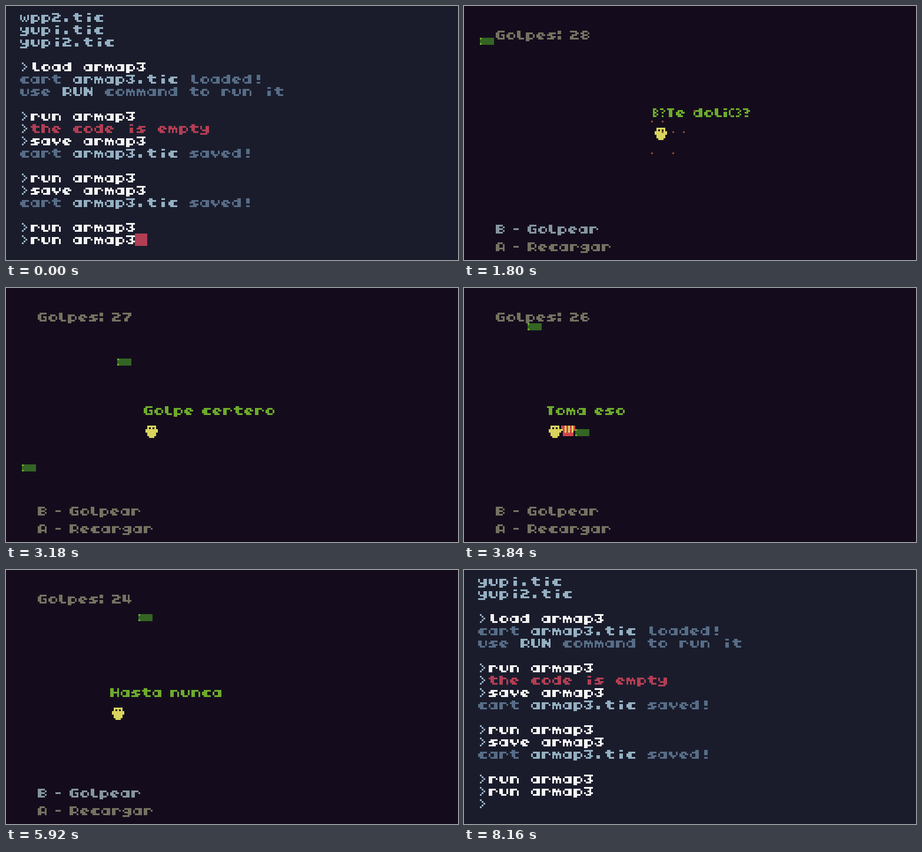
An HTML page with a canvas that plays this animation: 768 px wide and 432 px high, repeating every 8.2 s.

```html
<!DOCTYPE html>
<html lang="es">
<head>
<meta charset="utf-8">
<title>Golpes</title>
<style>
  html, body { margin: 0; width: 100%; height: 100%; overflow: hidden; background: #1a1c2c; }
  canvas { display: block; width: 768px; height: 432px; }
</style>
</head>
<body>
<canvas id="stage" width="768" height="432"></canvas>
<script>
const ctx = document.getElementById('stage').getContext('2d');
const LOOP = 8200, STEP = 20, GAME_ON = 440, GAME_OFF = 7640, BLINK = 8160;
const TICKS = 0.06; // game ticks per ms

function box(color, x, y, w = 1, h = 1) {
  ctx.fillStyle = color;
  ctx.fillRect(x, y, w, h);
}

// ---- stroke font: pairs are points xy, a plus makes the stroke two wide ----
const ring = '11 31 42 43 34 14 03 02 11';
const arch = '21 31 42 44';
const tail = '+31 34,13 23,35 05';
const cup = '14 34 43';
const stem = '+00 04';

const letters = {
  a: `${ring},+31 34`,
  c: '41 11 02 22,03 23,14 44',
  d: `${ring},+30 34`,
  e: '11 31,02 12,32 42,03 23,14 34',
  g: `21 11 02,${tail}`,
  h: `${stem},${arch}`,
  i: '+20,+22 24',
  l: '+10 13,24 44',
  m: '04 01 11,02 42 44,31,22 24',
  n: `+01 04,${arch}`,
  o: `${ring},+02 03`,
  p: `${ring},+01 05`,
  r: '+01 04,21 31 42',
  s: '41 11 02 22,23 43 34 04',
  t: '+10 13,01 41,24 44',
  u: `+01 03,${cup} 41`,
  v: '+01 02,13 33,24,42 41',
  w: '01 03 14,34 43 41,22 23',
  y: `01 02,${tail}`,
  A: '+01 04,10 30 41 44,13 43',
  B: `${stem},20 30 41,12 32,${cup}`,
  G: '+01 03,40 10,14 44 42 32',
  H: `${stem},40 44,12 42`,
  N: `${stem},40 44,21 22 32 33`,
  R: `${stem},20 30 41 42 33 23,44`,
  T: '10 40,+20 24',
  U: `+00 03,${cup} 40`,
  2: '00 30,+31,12 32,+03,04 44',
  3: '00 40,31 22 32,+33,03 14 34',
  4: '+00 02,03 43,30 34',
  5: '00 40,+01,12 32,+33,04 34',
  6: `+01 03,10 30,22 32 43,${cup}`,
  7: '00 40,+31,+22,+13 14',
  8: `10 30,+01,41,12 32,+03,${cup}`,
  9: `10 30,+01,12 22,41 43,${cup}`,
  '.': '+13 14',
  ':': '+20 21,+23 24',
  '!': '+20 22,+24',
  '?': '10 30,+31,+22,+24',
  '-': '12 32',
  '>': '10 32 14',
  // accented letters come out as two narrow characters
  '¿': '00 04 14 23 12 21 10,40 50 61 52,54',
  'ó': '20 10 01 03 14 24,40 50 61 52 63 54 44'
};

// Walks every stroke cell by cell.
function trace(strokes) {
  const cells = [];
  for (const stroke of strokes.split(',')) {
    const bold = stroke[0] === '+';
    const points = stroke.slice(bold ? 1 : 0).split(' ').map(p => [+p[0], +p[1]]);
    const plot = (x, y) => {
      cells.push([x, y]);
      if (bold) cells.push([x + 1, y]);
    };
    let [x, y] = points[0];
    plot(x, y);
    for (const [px, py] of points) {
      while (x !== px || y !== py) {
        x += Math.sign(px - x);
        y += Math.sign(py - y);
        plot(x, y);
      }
    }
  }
  const xs = cells.map(c => c[0]);
  const left = Math.min(...xs);
  return { cells, left, width: Math.max(...xs) - left + 1 };
}

const font = {};
for (const ch in letters) font[ch] = trace(letters[ch]);

function print(text, x, y, color, fixed) {
  for (const ch of text) {
    const glyph = font[ch];
    if (glyph) {
      const x0 = fixed ? x : x - glyph.left;
      for (const [cx, cy] of glyph.cells) box(color, x0 + cx, y + cy);
    }
    x += fixed ? 6 : glyph ? glyph.width + 1 : 4;
  }
  return x;
}

// ---- console ----
const TERM = { bg: '#1a1c2c', red: '#b13e53', white: '#f4f4f4', light: '#94b0c2', dim: '#566c86' };
const file = name => [['light', name]];
const prompt = (text, color = 'white') => [['light', '>'], [color, text]];
const cart = what => [['dim', 'cart '], ['light', 'armap3.tic'], ['dim', ` ${what}!`]];
const run = prompt('run armap3'), save = prompt('save armap3'), blank = [];

const history = [
  file('wpp2.tic'), file('yupi.tic'), file('yupi2.tic'), blank,
  prompt('load armap3'), cart('loaded'),
  [['dim', 'use '], ['light', 'RUN'], ['dim', ' command to run it']], blank,
  run, prompt('the code is empty', 'red'), save, cart('saved'), blank,
  run, save, cart('saved'), blank,
  run, run
];
const afterRun = [...history.slice(1), prompt('')];

function drawConsole(lines, cursor) {
  box(TERM.bg, 0, 0, 256, 144);
  let x, y;
  lines.forEach((line, i) => {
    x = 8;
    y = 4 + i * 7;
    for (const [color, text] of line) x = print(text, x, y, TERM[color], true);
  });
  if (cursor) box(TERM.red, x - 1, y - 1, 7, 7);
}

// ---- game ----
const PAL = {
  bg: '#140c1c', gray: '#757161', blue: '#8595a1', lime: '#6daa2c',
  green: '#346524', yellow: '#dad45e', red: '#d04648', brown: '#854c30'
};
const GLOVE_MS = 100, HOLD_MS = 300, BURST_TICKS = 8, FIRST_LEFT = 28;

const punches = [
  { at: 1600, say: '¿Te dolió?' },
  { at: 2545, say: 'Golpe certero' },
  { at: 3800, say: 'Toma eso', hold: 30 },
  { at: 4830, say: 'Golpe certero', bar: 2 },
  { at: 5640, say: 'Hasta nunca', bar: 3 },
  { at: 6790, say: 'Toma eso', bar: 4 }
];

// One bar drops every second until a punch breaks it.
const bars = [9, 63, 36, 71, 75, 90, 22].map((x, i) => {
  const punch = punches.find(p => p.bar === i);
  return { x, born: 1440 + i * 1000, gone: punch ? punch.at + GLOVE_MS / 2 : LOOP };
});

// Where the player heads from a given time on, one pixel per tick and axis.
const start = { x: 104, y: 28 };
const moves = [
  { at: GAME_ON, x: 134, y: 58 },
  { at: 1100, x: 108, y: 69 },
  { at: 2200, x: 88, y: 81 },
  { at: 2650, x: 79, y: 78 },
  { at: 3280, x: 48 },
  { at: 3860, x: 60 },
  { at: 4080, x: 39 },
  { at: 4650, x: 13 },
  { at: 5083, x: 60 },
  { at: 5930, x: 67 }
];

const random = n => {
  const v = Math.sin(n * 12.9898) * 43758.5453;
  return v - Math.floor(v);
};
const spread = n => Math.floor(random(n) * 5) - 2;
const sparks = Array.from({ length: 8 }, (_, i) => [spread(i + 1), spread(i + 51)]);

const approach = (from, to, step) =>
  from + Math.sign(to - from) * Math.min(Math.abs(to - from), step);

function playerAt(t) {
  let { x, y } = start, goalY = y;
  moves.forEach((move, i) => {
    if (t < move.at) return;
    const end = i + 1 < moves.length ? moves[i + 1].at : GAME_OFF;
    const step = Math.round((Math.min(t, end) - move.at) * TICKS);
    goalY = move.y ?? goalY;
    x = approach(x, move.x, step);
    y = approach(y, goalY, step);
  });
  return [x, y];
}

function drawPlayer(x, y) {
  box(PAL.yellow, x + 1, y, 5, 6);
  box(PAL.yellow, x, y + 2, 7, 2);
  box(PAL.yellow, x + 2, y + 6, 3, 1);
  for (const dx of [2, 4]) box(PAL.bg, x + dx, y + 1);
}

function drawGlove(x, y) {
  box(PAL.red, x, y, 8, 3);
  box(PAL.red, x + 1, y + 3, 6, 3);
  box(PAL.yellow, x, y + 2);
  for (let dx = 2; dx < 7; dx += 2) box(PAL.yellow, x + dx, y, 1, 4);
}

function drawBar(x, y) {
  box(PAL.green, x, y, 8, 4);
  for (const dy of [0, 3]) box(PAL.lime, x, y + dy);
}

function drawGame(t) {
  box(PAL.bg, 0, 0, 256, 144);
  ctx.save();
  ctx.beginPath();
  ctx.rect(8, 4, 240, 136);
  ctx.clip();

  const [x, y] = playerAt(t);
  const last = punches.filter(p => p.at <= t).length - 1;
  const { at = -LOOP, say = '', hold = HOLD_MS } = punches[last] || {};
  const age = t - at;

  print(`Golpes: ${FIRST_LEFT - last}`, 18, 14, PAL.gray);
  print('B - Golpear', 18, 124, age < hold ? PAL.blue : PAL.gray);
  print('A - Recargar', 18, 134, PAL.gray);
  print(say, x - 1, y - 11, PAL.lime);

  drawPlayer(x, y);
  if (age < GLOVE_MS) drawGlove(x + 7, y);

  for (const { x: barX, born, gone } of bars) {
    if (t >= born && t < gone) drawBar(barX, Math.round((t - born) * TICKS) - 4);
  }

  const n = Math.round((age - GLOVE_MS) * TICKS);
  if (n >= 0 && n < BURST_TICKS) {
    for (const [dx, dy] of sparks) box(PAL.brown, x + 10 + dx * n, y + 2 + dy * n);
  }
  ctx.restore();
}

function frame() {
  const t = Math.floor((performance.now() % LOOP) / STEP) * STEP;
  ctx.setTransform(3, 0, 0, 3, 0, 0);
  if (t < GAME_ON) drawConsole(history, true);
  else if (t < GAME_OFF) drawGame(t);
  else drawConsole(afterRun, t < BLINK);
  requestAnimationFrame(frame);
}
frame();
</script>
</body>
</html>
```
